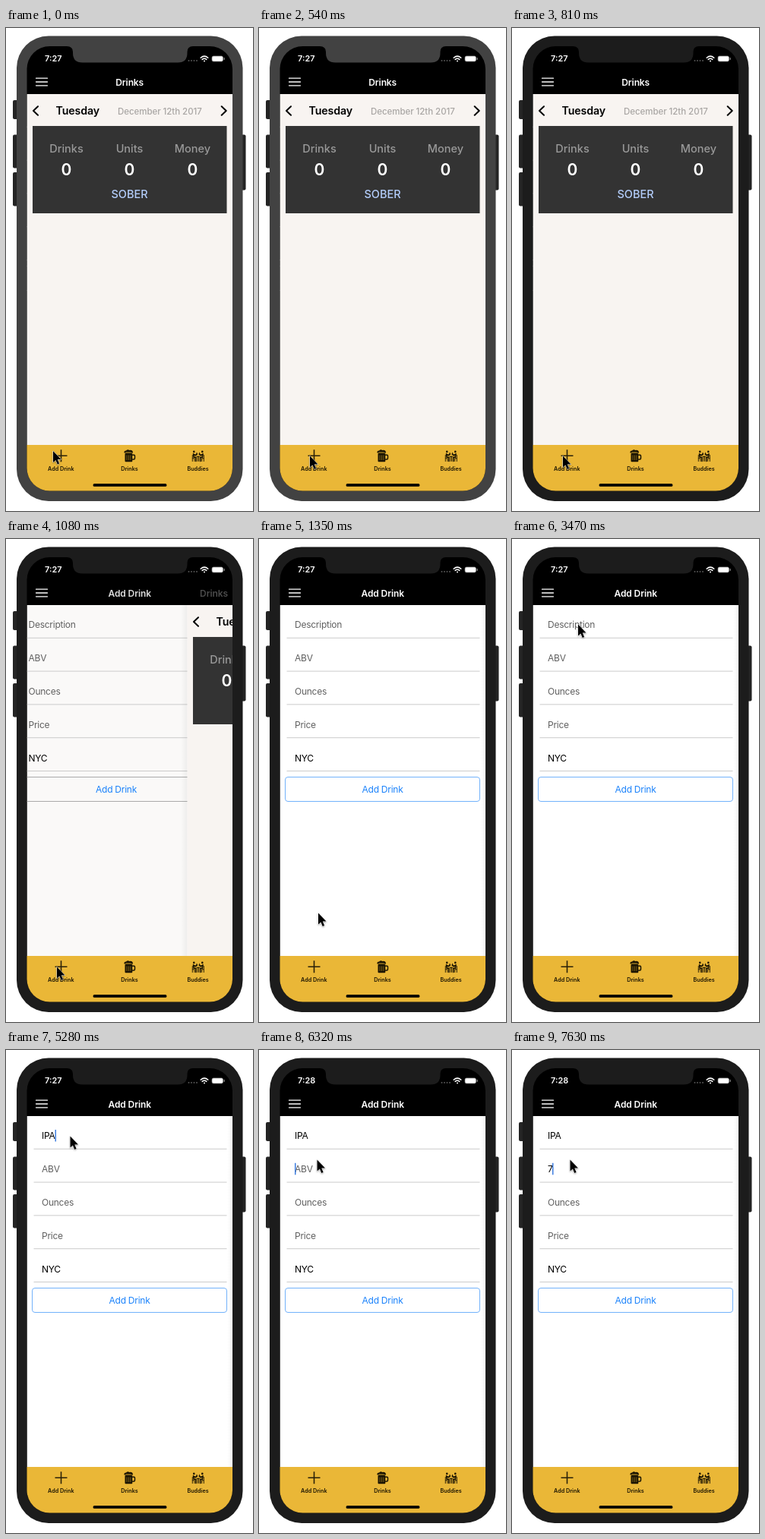
These frames come from a looping animation (325 px wide and 636 px high, 8 s). An HTML page:

```html
<!DOCTYPE html>
<html lang="en">
<head>
<meta charset="utf-8">
<title>Drinks app</title>
<style>
  html, body { margin: 0; width: 100%; height: 100%; overflow: hidden; background: #fff; }
  svg { display: block; width: 325px; height: 636px; }
  text { font-family: Inter, Roboto, "Liberation Sans", sans-serif; }
  .mid { text-anchor: middle; }
  .title { font-size: 12px; font-weight: 600; letter-spacing: -.1px; }
  .field { font-size: 12px; letter-spacing: -.25px; }
  .stat { font-size: 14.5px; font-weight: 500; }
  .zero { font-size: 21px; font-weight: 600; fill: #fff; }
  .tab { font-size: 7.2px; font-weight: 600; fill: #1c1503; }
  .line { fill: none; stroke-linecap: round; stroke-linejoin: round; }
</style>
</head>
<body>
<svg viewBox="0 0 325 636">
  <defs>
    <clipPath id="screen"><rect x="27.5" y="24" width="270.5" height="585.5" rx="30"/></clipPath>
    <clipPath id="page"><rect x="27.5" y="87" width="270.5" height="462"/></clipPath>
    <linearGradient id="edge"><stop offset="0" stop-opacity="0"/><stop offset="1" stop-opacity=".05"/></linearGradient>
  </defs>

  <g fill="#242424">
    <rect x="9" y="95" width="8" height="25" rx="2"/>
    <rect x="9" y="140.5" width="8" height="44" rx="2"/>
    <rect x="9" y="190" width="8" height="44.5" rx="2"/>
    <rect x="307" y="140.5" width="8.5" height="73" rx="2"/>
  </g>
  <rect id="body" x="14" y="10.5" width="297.5" height="612.5" rx="42"/>

  <g clip-path="url(#screen)">
    <rect x="27" y="24" width="272" height="586"/>
    <g clip-path="url(#page)">
      <rect id="paper" x="27" y="87" width="272" height="462"/>
      <g id="form">
        <g id="fields"></g>
        <rect id="button" x="34.5" y="313.5" width="256" height="32" rx="3.5" fill="none"/>
        <text class="field mid" x="162.5" y="333.5" fill="#1a82fb">Add Drink</text>
        <rect id="caret" width="1.5" height="15.5" fill="#3f7fe0"/>
      </g>
      <g id="drinks">
        <rect x="19" y="87" width="8.5" height="462" fill="url(#edge)"/>
        <rect x="27.5" y="87" width="272" height="462" fill="#f8f4f1"/>
        <path class="line" d="M42 103.3 36 109 42 114.700M283.700 103.300 289.700 109 283.700 114.700" stroke="#000" stroke-width="2"/>
        <text x="65.500" y="114.300" font-size="14.200" font-weight="600" letter-spacing="-.1">Tuesday</text>
        <text x="147" y="113.500" font-size="11.500" font-weight="500" letter-spacing="-.05" fill="#a9a6a4">December 12th 2017</text>
        <rect x="35" y="129" width="255.500" height="115" fill="#333"/>
        <g id="stats"></g>
        <text class="stat mid" x="162.500" y="224.300" fill="#b3cdfa">SOBER</text>
      </g>
    </g>

    <text id="clock" x="51" y="44.300" font-size="10.900" font-weight="600" fill="#fff"></text>
    <g fill="#555">
      <circle cx="240.500" cy="43" r="1"/><circle cx="244" cy="43" r="1"/>
      <circle cx="247.500" cy="43" r="1"/><circle cx="251" cy="43" r="1"/>
    </g>
    <g class="line" stroke="#fff" stroke-width="1.500">
      <path d="M256.200 39.300Q261 35 265.800 39.300M258.200 41.400Q261 39 263.800 41.400"/>
      <path d="M261 43.400v.1" stroke-width="2"/>
      <path d="M39.500 66.200H54.500M39.500 71H54.500M39.500 75.800H54.500" stroke-width="1.300"/>
    </g>
    <rect x="271" y="37" width="14.500" height="7" rx="2" fill="#fff" stroke="#888" stroke-width=".7"/>
    <rect x="286.500" y="39" width="1.300" height="3" rx=".6" fill="#888"/>
    <text id="formTitle" class="title mid" x="162.700" y="75.500">Add Drink</text>
    <text id="drinksTitle" class="title mid" y="75.500">Drinks</text>

    <rect x="27" y="549" width="272" height="61" fill="#eab737"/>
    <path d="M64.500 563.300H80.500M72.500 555.300V571.300" stroke="#2c2209" stroke-width="1.600"/>
    <g fill="#1c1503">
      <path d="M155.500 559.500q-.5-3 2.500-3 2-2 4.500-.6 4.500-.8 4.500 3.600z"/>
      <rect x="156.500" y="560" width="9.800" height="11.300" rx="1"/>
    </g>
    <path class="line" d="M166.500 562.200H168.500Q169.500 562.200 169.500 563.500V566.500Q169.500 568 168 568H166.500" stroke="#1c1503" stroke-width="1.500"/>
    <path d="M159 562.500V569M161.400 562.500V569M163.800 562.500V569M157.500 558.600h7" stroke="#b8902b" stroke-width=".6"/>
    <g id="buddy" fill="#1c1503" stroke="#1c1503">
      <circle cx="247.300" cy="557.900" r="1.300" stroke="none"/>
      <path class="line" d="M246.600 560.800 247.300 565.300H250V570.300M247 561.500 249.500 562.600 251.300 561" stroke-width="1.700"/>
      <path class="line" d="M245.300 562.500V566.800H248V570.500M245.300 566.800V570.500M251 564.300H253M252.800 564.300V570.300M251 559.300v1.500" stroke-width=".9"/>
    </g>
    <use href="#buddy" transform="matrix(-1 0 0 1 505.600 0)"/>
    <g class="tab mid">
      <text x="72.300" y="582.500">Add Drink</text>
      <text x="162.500" y="582.500">Drinks</text>
      <text x="252.500" y="582.500">Buddies</text>
    </g>
    <rect x="114.500" y="600" width="97" height="3.800" rx="1.900"/>
  </g>
  <path id="notch" d="M80 23H246V24Q238.500 24 238.500 31.500V33Q238.500 45.500 226 45.500H100.500Q88 45.500 88 33V31.500Q88 24 80 24Z"/>

  <path id="cursor" d="M0 0V15L3.400 11.900 5.700 17.400 8.100 16.400 5.800 11H10.500Z" stroke="#fff" stroke-width="1" stroke-linejoin="round" paint-order="stroke" style="filter:drop-shadow(0 1px 1px #0005)"/>
</svg>

<script>
const LOOP = 8000, ROW = 43.8;
const $ = id => document.getElementById(id);
const set = (id, attrs) => {
  for (const k in attrs) $(id).setAttribute(k, attrs[k]);
};
// Latest [time, ...values] entry reached at time t
const at = (steps, t) => steps.filter(s => s[0] <= t).pop().slice(1);

const hints = ['Description', 'ABV', 'Ounces', 'Price'];

// time, x, y
const pointer = [
  [0, 62, 557], [270, 65, 560.5], [540, 67, 563.5], [1350, 78, 492.5],
  [1620, 81, 235], [1890, 96, 77], [2160, 87, 100], [2430, 87, 107],
  [2700, 87, 112.5], [4010, 84.5, 113.5], [5550, 83, 123.5], [5820, 76.5, 144.5]
];
// time, description, ABV
const typed = [
  [0, '', ''], [4510, 'I', ''], [4780, 'IP', ''], [5280, 'IPA', ''], [7630, 'IPA', '7']
];
// time, x, row, opacity
const carets = [
  [0, 47, 0, 0], [2970, 47, 0, 1], [3470, 47, 0, 0], [3740, 47, 0, .5], [4010, 47, 0, 1],
  [4510, 50, 0, 1], [4780, 57.5, 0, 1], [5280, 64.5, 0, 1],
  [5820, 47, 1, 1], [7090, 47, 1, 0], [7630, 53, 1, 1]
];
// time, drinks page shift, form shift, drinks title x, title colours
const slide = [
  [0, 0, -81, 162.7, '#fff', 'none'],
  [1080, 211, -17.5, 273.5, '#4c4c4c', '#dcdcdc'],
  [1350, 272, 0, 300, 'none', '#fff']
];

$('fields').innerHTML = [...hints, 'NYC'].map((s, i) =>
  `<text class="field" id="field${i}" x="47" y="${117.4 + i * ROW}" fill="${i < 4 ? '#606060' : '#000'}">${s}</text>
   <path d="M36.5 ${130.3 + i * ROW}H290.500" stroke="#cbcbcb"/>`).join('');

$('stats').innerHTML = ['Drinks', 'Units', 'Money'].map((s, i) =>
  `<text class="stat mid" x="${79.5 + i * 83}" y="163.500" fill="#999">${s}</text>
   <text class="zero mid" x="${79.5 + i * 83}" y="194.300">0</text>`).join('');

function draw(t) {
  const shell = t < 810 ? '#424242' : '#1c1c1c';
  set('body', { fill: shell });
  set('notch', { fill: shell });
  $('clock').textContent = t < 6320 ? '7:27' : '7:28';

  const [drinksX, formX, titleX, drinksInk, formInk] = at(slide, t);
  const moving = t < 1350;
  set('drinks', { transform: `translate(${drinksX})` });
  set('form', { transform: `translate(${formX})` });
  set('drinksTitle', { x: titleX, fill: drinksInk });
  set('formTitle', { fill: formInk });
  set('paper', { fill: moving ? '#faf9f8' : '#fff' });
  set('button', { stroke: moving ? '#aaa' : '#72b2fb' });

  at(typed, t).forEach((s, i) => {
    $('field' + i).textContent = s || hints[i];
    set('field' + i, { fill: s ? '#000' : '#606060' });
  });
  const [cx, row, opacity] = at(carets, t);
  set('caret', { x: cx, y: 105 + row * ROW, opacity });

  set('cursor', { transform: `translate(${at(pointer, t)})` });
}

const start = performance.now();
function tick() {
  draw((performance.now() - start) % LOOP);
  requestAnimationFrame(tick);
}
tick();
</script>
</body>
</html>
```
